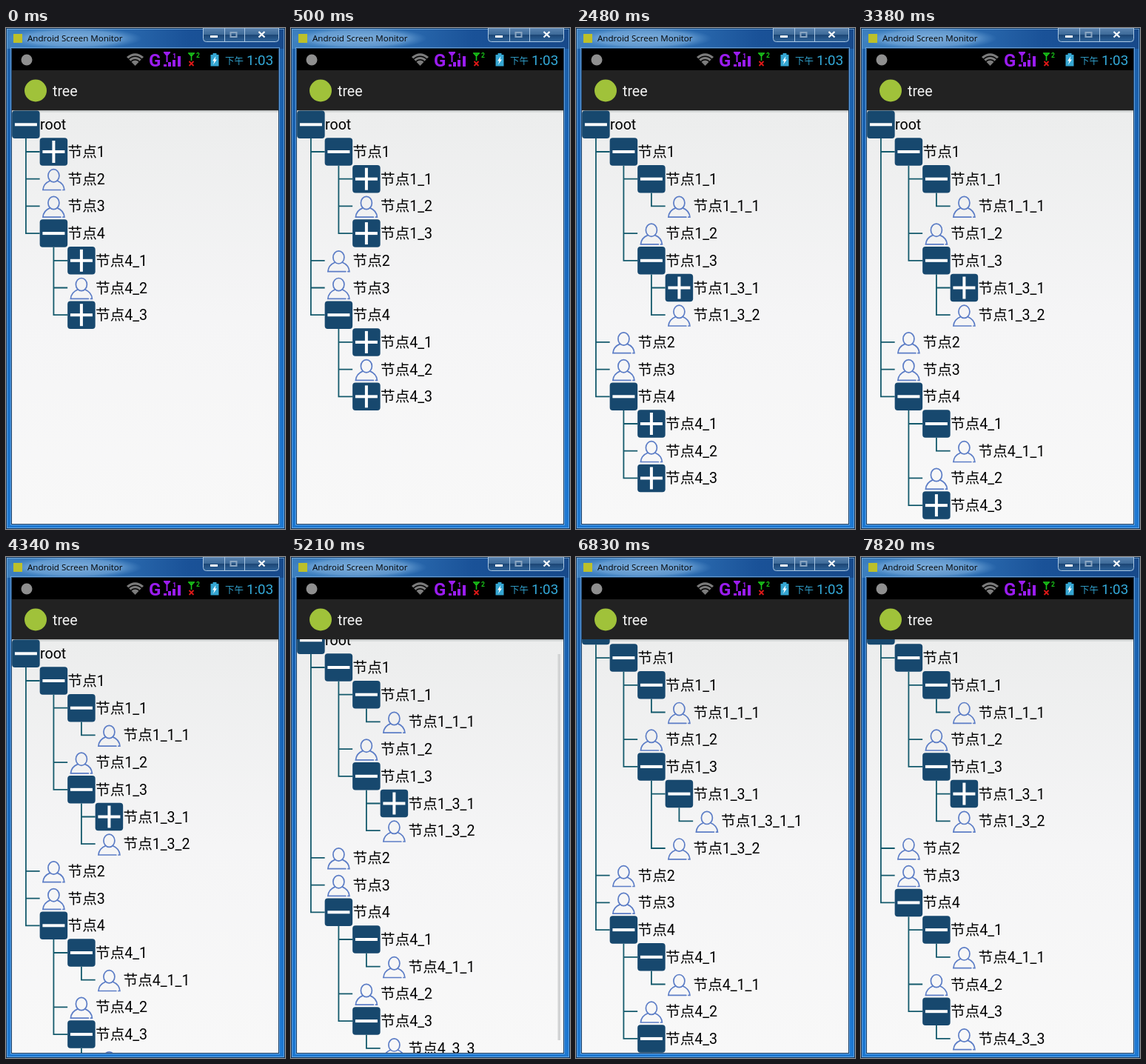
Recreate the animation shown at these times as an HTML page. Size 377 px wide and 676 px high, loop 8 s.

```html
<!DOCTYPE html>
<html lang="zh-CN">
<head>
<meta charset="utf-8">
<style>
html, body { margin: 0; width: 100%; height: 100%; overflow: hidden; background: #1a6cc0; }
svg { display: block; position: absolute; left: 0; top: 0; }
text { font-family: Roboto, "Noto Sans CJK SC", "Noto Sans CJK", sans-serif; white-space: pre; }
.label { font-size: 19.6px; fill: #000; }
.link { fill: none; stroke: #145a6c; stroke-width: 1.8; }
.person { fill: none; stroke: #5c7dc6; stroke-width: 1.7; stroke-linecap: round; }
.line { fill: none; }
</style>
</head>
<body>
<svg width="377" height="676" viewBox="0 0 377 676">
  <defs>
    <linearGradient id="frame" x2="0" y2="1">
      <stop offset="0" stop-color="#1f5fa6"/><stop offset=".25" stop-color="#1762b4"/>
      <stop offset="1" stop-color="#1d78d2"/>
    </linearGradient>
    <linearGradient id="bar">
      <stop offset="0" stop-color="#3c7fbf"/><stop offset=".4" stop-color="#2b6bb0"/>
      <stop offset=".65" stop-color="#1a5298"/><stop offset="1" stop-color="#17498a"/>
    </linearGradient>
    <radialGradient id="glow">
      <stop offset="0" stop-color="#8fbce4" stop-opacity=".85"/>
      <stop offset=".7" stop-color="#7fb0de" stop-opacity=".6"/>
      <stop offset="1" stop-color="#5c98d0" stop-opacity="0"/>
    </radialGradient>
    <linearGradient id="button" x2="0" y2="1">
      <stop offset="0" stop-color="#5a83b0"/><stop offset=".48" stop-color="#3d6a98"/>
      <stop offset=".5" stop-color="#1c4675"/><stop offset="1" stop-color="#2f649b"/>
    </linearGradient>
    <linearGradient id="page" x2="0" y2="1">
      <stop offset="0" stop-color="#eceded"/><stop offset=".5" stop-color="#f5f5f6"/>
      <stop offset="1" stop-color="#f8f8f8"/>
    </linearGradient>
    <clipPath id="view"><rect x="8" y="111" width="360" height="558"/></clipPath>
    <g id="box">
      <rect x="-18.75" y="-18.75" width="37.5" height="37.5" rx="4" fill="#17486e"/>
      <rect x="-15" y="-2" width="30" height="4" fill="#fff"/>
    </g>
    <g id="plus"><use href="#box"/><rect x="-2" y="-15" width="4" height="30" fill="#fff"/></g>
    <g id="person" class="person">
      <ellipse cy="-4.4" rx="7.5" ry="8.6"/>
      <path d="M-5 2.5C-10 4.500-14 9-14.500 14.800H9.500M5 2.500C10 4.500 14 9 14.500 14.800H12.500"/>
    </g>
  </defs>

  <!-- window -->
  <rect width="377" height="676" fill="url(#frame)"/>
  <rect width="377" height="28" fill="url(#bar)"/>
  <ellipse cx="92" cy="14" rx="92" ry="15" fill="url(#glow)"/>
  <rect class="line" x=".5" y=".5" width="376" height="675" stroke="#12365f"/>
  <rect class="line" x="1.5" y="1.5" width="374" height="673" stroke="#8fc4f0" stroke-opacity=".6"/>
  <rect class="line" x="6.5" y="26.5" width="363" height="644" stroke="#7fb6e8" stroke-opacity=".7"/>
  <rect class="line" x="7.5" y="27.5" width="361" height="642" stroke="#1b3f66"/>
  <rect x="10" y="8" width="12" height="12" fill="#bcc02a"/>
  <text x="29" y="18" font-size="11.55" style="font-family:'Open Sans',sans-serif">Android Screen Monitor</text>
  <path d="M266.500 0V14.500Q266.500 18.500 270.500 18.500H364.500Q368.500 18.500 368.500 14.500V0Z" fill="url(#button)" stroke="#a9c6e2"/>
  <path d="M295.500 0V18M322.500 0V18" stroke="#a9c6e2"/>
  <rect x="276" y="10" width="10" height="3" fill="#fff"/>
  <rect class="line" x="303.500" y="6" width="8" height="6" stroke="#8ba6c2" stroke-width="2"/>
  <path d="M341.500 5L349.500 12.500M349.500 5L341.500 12.500" stroke="#fff" stroke-width="2.300"/>

  <!-- status bar -->
  <rect x="8" y="28" width="360" height="30" fill="#000"/>
  <circle cx="28" cy="43" r="7.500" fill="#8f8f8f"/>
  <path d="M174.500 51L163 39Q174.500 29.500 186 39Z" fill="#7c7c7c"/>
  <path class="line" d="M165 42.500Q174.500 34 184 42.500M168 46Q174.500 39.500 181 46" stroke="#000" stroke-width="1.300"/>
  <g fill="#9a1cf0">
    <text x="193" y="52" font-size="24" font-weight="700">G</text>
    <path d="M213 49h4v3h-4zM219 46h4v6h-4zM225 43h4v9h-4zM232 38h4v14h-4z"/>
    <text x="225" y="41" font-size="9" font-weight="700">1</text>
    <path class="line" d="M213 33H222M214 33L217.500 37L221 33M217.500 33V46" stroke="#9a1cf0" stroke-width="2"/>
  </g>
  <path class="line" d="M246 34H255M247 34L250.500 38L254 34M250.500 34V44" stroke="#19c519" stroke-width="1.600"/>
  <text x="257" y="40" font-size="8.500" font-weight="700" fill="#19c519">2</text>
  <path d="M247.500 45L253.500 51M253.500 45L247.500 51" stroke="#e01818" stroke-width="1.800"/>
  <path d="M279.500 34h5v2h3v15.500h-11v-15.500h3z" fill="#35a6d2"/>
  <path d="M283.500 38L279 44.500H281.500L280 49.500L285 42.500H282.500Z" fill="#fff"/>
  <text x="296" y="49" font-size="12.500" fill="#319fca">下午</text>
  <text x="325" y="49.500" font-size="18.800" fill="#33a9d8">1:03</text>

  <!-- action bar -->
  <rect x="8" y="57" width="360" height="54" fill="#222"/>
  <circle cx="40" cy="84.500" r="15" fill="#a0c23a"/>
  <text x="63" y="92" font-size="19.600" fill="#f2f2f2">tree</text>

  <rect x="8" y="111" width="360" height="558" fill="url(#page)"/>
  <rect x="8" y="111" width="360" height="1.500" fill="#b4b8b8"/>
  <rect x="8" y="112.500" width="360" height="1.500" fill="#d9dcdc"/>
  <g id="stage" clip-path="url(#view)"></g>
</svg>
<script>
const LOOP = 8000, PITCH = 36.7, INDENT = 37.5, HALF = 18.75, LEFT = 26.9, TOP = 130.3;
const kids = {
  root: ['1', '2', '3', '4'],
  1: ['1_1', '1_2', '1_3'],
  '1_1': ['1_1_1'],
  '1_3': ['1_3_1', '1_3_2'],
  '1_3_1': ['1_3_1_1'],
  4: ['4_1', '4_2', '4_3'],
  '4_1': ['4_1_1'],
  '4_3': ['4_3_3']
};
// time, node toggled (if any), scroll offset, scrollbar shown
const steps = [
  [0, '', 0, 0],
  [500, '1', 0, 0],
  [1520, '1_1', 0, 0],
  [2480, '1_3', 0, 0],
  [3380, '4_1', 0, 0],
  [4340, '4_3', 0, 0],
  [5210, '', 18, 1],
  [5240, '', 30.9, 1],
  [6830, '1_3_1', 30.9, 0],
  [7820, '1_3_1', 30.9, 0]
];

function drawTree(open, scroll, bar) {
  let row = 0, links = '', nodes = '';
  function visit(id, depth) {
    const x = LEFT + depth * INDENT, y = TOP + PITCH * row++ - scroll;
    const isOpen = open.has(id);
    const icon = !kids[id] ? 'person' : isOpen ? 'box' : 'plus';
    const name = id === 'root' ? id : '节点' + id;
    nodes += `<use href="#${icon}" x="${x}" y="${y}"/>` +
      `<text class="label" x="${x + HALF + 0.4}" y="${y + 7}">${name}</text>`;
    if (isOpen) {
      let last = y;
      for (const kid of kids[id]) {
        last = visit(kid, depth + 1);
        links += `M${x} ${last}h${INDENT - HALF}`;
      }
      links += `M${x} ${y + HALF}V${last + 0.9}`;
    }
    return y;
  }
  visit('root', 0);
  const thumb = bar ? `<rect x="360.5" y="${113 + scroll}" width="3.5" height="521" fill="#d2d3d4"/>` : '';
  return `<path class="link" d="${links}"/>${nodes}${thumb}`;
}

const stage = document.getElementById('stage');
const open = new Set(['root', '4']);
const scenes = steps.map(([time, id, scroll, bar]) => {
  if (id && !open.delete(id)) open.add(id);
  const g = document.createElementNS('http://www.w3.org/2000/svg', 'g');
  g.innerHTML = drawTree(open, scroll, bar);
  stage.append(g);
  return { time, g };
});

const start = performance.now();
function tick() {
  const t = (performance.now() - start) % LOOP;
  const now = scenes.findLast(s => s.time <= t);
  for (const s of scenes) s.g.style.display = s === now ? '' : 'none';
  requestAnimationFrame(tick);
}
tick();
</script>
</body>
</html>
```
